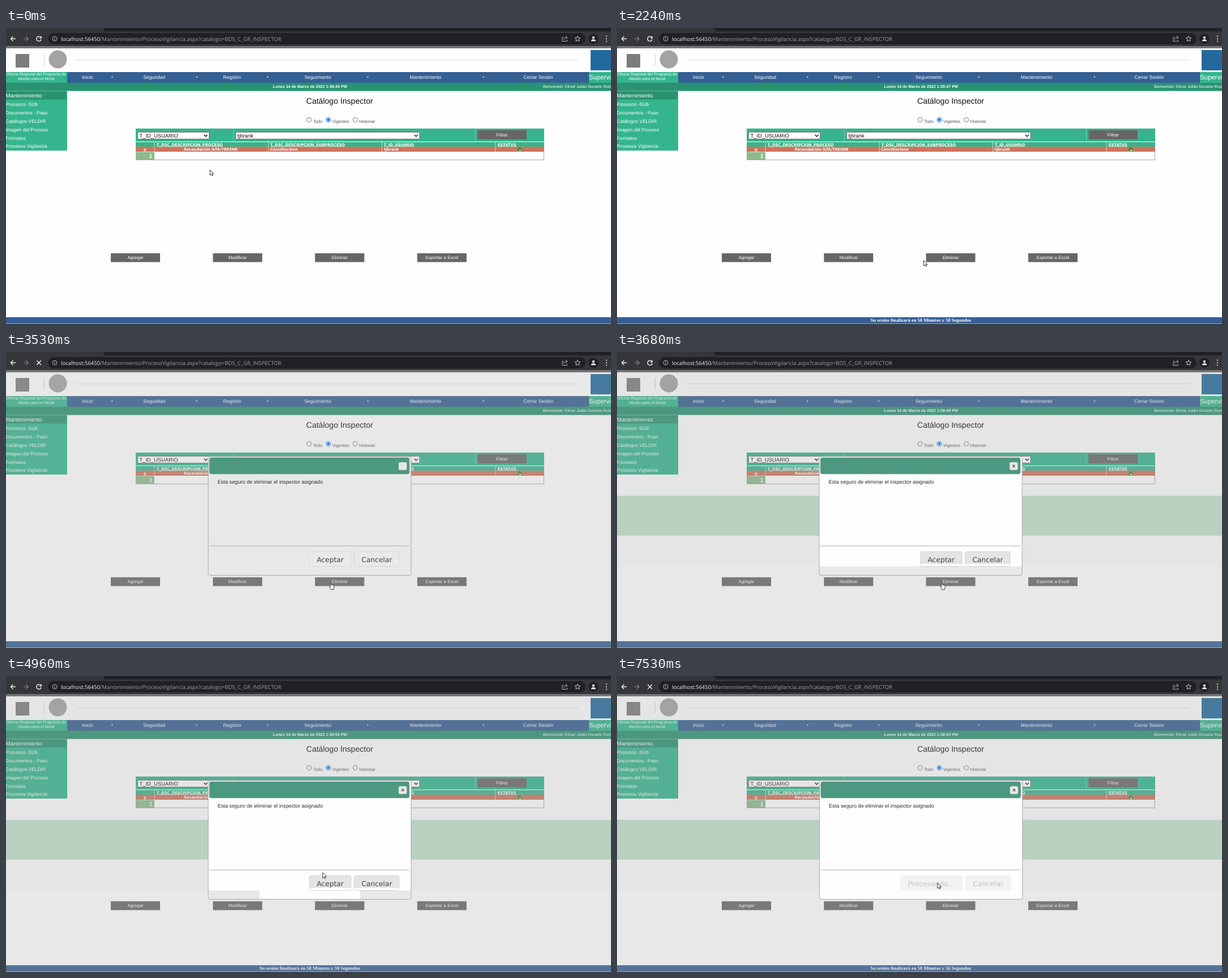
Animation of 1068x524 px, one loop 8 s. Source, as an HTML page:

```html
<!DOCTYPE html>
<html lang="es">
<head>
<meta charset="utf-8">
<title>Catálogo Inspector</title>
<style>
  html, body { margin: 0; width: 100%; height: 100%; overflow: hidden; background: #fff; }
  svg { display: block; }
  text { font-family: "Liberation Sans", Arial, sans-serif; text-rendering: geometricPrecision; white-space: pre; }
  .url { font-family: "Open Sans", "Noto Sans", sans-serif; }
  .grid { font-family: "DejaVu Sans", Verdana, sans-serif; font-weight: bold; }
  .link { text-decoration: underline; }
  .wide { font-family: "DejaVu Sans", Verdana, sans-serif; }
  .serif { font-family: "Liberation Serif", Times, serif; font-weight: bold; }
  .bold { font-weight: bold; }
  .mid { text-anchor: middle; }
</style>
</head>
<body>
<svg id="stage" width="1068" height="524" viewBox="0 0 1068 524"></svg>
<script>
const GREEN = '#35b58e', DARK = '#2a9270', BLUE = '#365f93', GREY = '#666666', RUST = '#d1735d';

const rect = (x, y, w, h, fill, more = '') =>
  `<rect x="${x}" y="${y}" width="${w}" height="${h}" fill="${fill}" ${more}/>`;
const circle = (x, y, r, fill, more = '') =>
  `<circle cx="${x}" cy="${y}" r="${r}" fill="${fill}" ${more}/>`;
const text = (x, y, size, str, fill = '#fff', cls = '', id = '') =>
  `<text x="${x}" y="${y}" font-size="${size}" fill="${fill}" class="${cls}" id="${id}">${str}</text>`;
const line = (d, stroke, width = 1, more = '') =>
  `<path d="${d}" fill="none" stroke="${stroke}" stroke-width="${width}" ${more}/>`;

function toolbar() {
  const dots = [14.5, 19, 23.5].map(y => circle(1060, y, 1.1, '#e8eaed')).join('');
  return rect(0, 0, 1068, 32, '#35363a')
    + rect(0, 32, 1068, 4, '#747577')
    + `<path d="M172 0H1068V6H176Q172.500 6 172 0Z" fill="#202124"/>`
    + rect(74, 9, 949, 20, '#202124', 'rx="10"')
    + line('M17 19H8.500M12.500 14.800L8.300 19L12.500 23.200', '#f1f3f4', 1.3)
    + line('M30.500 19H39M35 14.800L39.200 19L35 23.200', '#85878a', 1.2)
    + `<g id="reload">${line('M61.200 16.300A4.200 4.200 0 1 0 62.200 20', '#f1f3f4', 1.4)}`
    + `<path d="M62.700 14V18.500H58.200Z" fill="#f1f3f4"/></g>`
    + `<g id="stop">${line('M54.300 15.200L61.800 22.700M61.800 15.200L54.300 22.700', '#f1f3f4', 1.4)}</g>`
    + circle(86, 19, 4, 'none', 'stroke="#b4b7bb"')
    + line('M86 18.300V21.300M86 16.400V17.400', '#b4b7bb')
    + text(97, 22.5, 9.45, 'localhost:56450<tspan fill="#9aa0a6">/Mantenimiento/ProcesoVigilancia.aspx?catalogo=BDS_C_GR_INSPECTOR</tspan>', '#f1f3f4', 'url')
    + line('M984.500 16.500H982V23.500H990.500V21M984.500 20.500Q985 16.800 990.500 16.800M988 14L991 16.800L988 19.600', '#b4b7bb')
    + line('M1009 14.300L1010.400 17.400L1013.800 17.700L1011.200 20L1012 23.300L1009 21.500L1006 23.300L1006.800 20L1004.200 17.700L1007.600 17.400Z', '#c8cacd')
    + circle(1037, 19, 8.8, '#202124')
    + circle(1037, 17, 2.2, '#f1f3f4')
    + `<path d="M1032.800 23.200Q1033 20 1037 20T1041.200 23.200Z" fill="#f1f3f4"/>`
    + dots;
}

function header() {
  const nav = [[134, 'Inicio'], [242.3, 'Seguridad'], [383.3, 'Registro'], [526.7, 'Seguimiento'],
    [712.7, 'Mantenimiento'], [913.3, 'Cerrar Sesión']];
  return rect(17, 46, 24, 24, '#7c7c7c')
    + line('M67.500 46V66', '#cfcfcf')
    + circle(91.5, 55.5, 16, '#a3a3a3')
    + line('M123 56.500H1011', '#dedede')
    + rect(1032, 39, 36, 36, '#23699c')
    + rect(0, 78, 108, 19, GREEN)
    + rect(108, 78, 921, 19, BLUE)
    + rect(1029, 78, 39, 19, GREEN)
    + text(53, 84, 7.06, 'Oficina Regional del Programa de', '#fff', 'mid')
    + text(53, 91.5, 7.06, 'Abasto para el litoral', '#fff', 'mid')
    + nav.map(([x, s]) => text(x, 90.3, 8.5, s)).join('')
    + [187.3, 336.3, 462, 638.7, 843].map(x => text(x, 91, 8.5, '*', '#fff', 'mid')).join('')
    + text(1029, 90.5, 11.4, 'Supervi')
    + rect(0, 97, 1068, 14.5, DARK)
    + text(471.3, 106.3, 7.1, '', '#fff', 'bold', 'date')
    + text(948, 106.3, 7.05, 'Bienvenido: Elmar Julián Dovarte Ruiz');
}

function sideMenu() {
  const items = ['Procesos -SUb', 'Documentos - Paso', 'Catálogos VELDIR', 'Imagen del Proceso', 'Formatos', 'Procesos Vigilancia'];
  return rect(0, 111.5, 108, 105.5, GREEN)
    + rect(0, 112, 107, 14.5, DARK)
    + text(-0.5, 122.8, 9.8, 'Mantenimiento')
    + items.map((s, i) => text(-0.7, 137.7 + i * 14.95, 8.43, s)).join('');
}

const button = (x, y, label, id = '') =>
  `<g id="${id}">${rect(x, y, 87, 15.6, GREY)}${text(x + 43.5, y + 10.6, 7.95, label, '#fff', 'mid')}</g>`;

const select = (x, w, label) =>
  rect(x + .5, 184.5, w - 1, 12, '#fff', 'stroke="#767676" rx="1"')
  + text(x + 3.5, 193.7, 9.4, label, '#111')
  + line(`M${x + w - 9.5} 189l3 3l3 -3`, '#111', 1.4);

const radio = (x, label, on) =>
  circle(x, 162.5, 4, '#fff', `stroke="${on ? '#0075ff' : '#767676'}"`)
  + (on ? circle(x, 162.5, 2.4, '#0075ff') : '')
  + text(x + 7, 167.6, 7.7, label, '#555');

function catalog() {
  const heads = [[266, 'T_DSC_DESCRIPCION_PROCESO'], [466.5, 'T_DSC_DESCRIPCION_SUBPROCESO'], [667, 'T_ID_USUARIO'], [868, 'ESTATUS']];
  const cells = [[314, 'Recaudación ILTA/TRESNE'], [466, 'Conciliaciónn'], [667, 'tjbrank']];
  return text(530, 134.3, 14.05, 'Catálogo Inspector', '#111')
    + radio(535, 'Todo') + radio(569, 'Vigentes', true) + radio(616.5, 'Historial')
    + rect(229, 178, 721, 23, GREEN)
    + line('M401.500 178V201M828.500 178V201', '#6fcbae')
    + select(232, 127, 'T_ID_USUARIO') + select(405, 325.5, 'tjbrank')
    + rect(832.5, 181, 86.5, 16.3, GREY)
    + text(875.7, 191.8, 8, 'Filtrar', '#fff', 'mid')
    + rect(229.5, 202.5, 720, 31, '#fff', 'stroke="#a8a8a8"')
    + rect(229, 202, 721, 8, GREEN)
    + rect(229, 210, 721, 9, RUST)
    + line('M262 202V219M463 202V219M663.500 202V219M864 202V219', '#e5e0d8', .8)
    + heads.map(([x, s]) => text(x, 208.5, 6.68, s, '#fff', 'grid link')).join('')
    + text(245.3, 216.8, 6.5, 'o', '#fff', 'grid link mid')
    + cells.map(([x, s]) => text(x, 217, 6.55, s, '#fff', 'grid')).join('')
    + `<path d="M903 217.500L904.500 212.500L907 211L910 214L911.500 217.500Z" fill="#258a3d"/>`
    + `<path d="M905.500 217.500L907.500 214.500L909.500 217.500Z" fill="#eef5ea"/>`
    + rect(229.5, 219.5, 32.5, 14, '#8fba8e')
    + text(255.5, 230.2, 10, '1', '#fff', 'bold mid')
    + button(185, 398.8, 'Agregar') + button(365.3, 398.8, 'Modificar')
    + button(545.5, 398.8, 'Eliminar', 'remove') + button(726, 398.8, 'Exportar a Excel');
}

const footer = rect(0, 512, 1068, 11.5, BLUE) + text(447.5, 519.6, 8.5, '', '#fff', 'serif', 'session');

function dialogButton(x, w, label, look) {
  const looks = {
    faint: ['#e9e9e9', '#d9d9d9', '#444'],
    split: ['#e4e4e4', '#d6d6d6', '#444'],
    hover: ['#eeeeee', '#b0b0b0', '#222'],
    off: ['#f3f3f3', '#efefef', '#c2c2c2']
  };
  const [fill, edge, ink] = looks[look];
  return rect(x + .5, 353.5, w - 1, 26, fill, `stroke="${edge}" rx="2"`)
    + (look === 'split' ? rect(x + 1, 375, w - 2, 4, '#fdfdfd') : '')
    + text(x + w / 2, 371.6, 12.28, label, ink, 'wide mid');
}

function dialog(state) {
  if (state === 'none') return '';
  const opening = state === 'opening', working = state === 'working';
  const paper = opening ? '#e8e8e8' : '#fefefe';
  const look = opening ? 'faint' : working ? 'off' : 'split';
  const strip = opening || working ? '' : rect(357.5, 379.5, 357.5, 15.5, '#e8e8e8')
    + (state === 'drawn' ? '' : rect(448, 379.5, 177, 15.5, '#fefefe'));
  return rect(0, 36, 1068, 488, '#aaa', 'opacity=".27"')
    + (opening ? '' : rect(0, 36, 1068, 343.5, '#000', 'opacity=".013"') + rect(0, 254.5, 1068, 70.5, '#b8d1c1'))
    + `<g transform="translate(${working ? .6 : 0} 0)">`
    + rect(357, 185, 358.2, 210.3, paper, 'rx="3"') + strip
    + rect(357, 185, 358.2, 210.3, 'none', 'rx="3" stroke="#a6a6a6"')
    + rect(359.3, 187.3, 352.5, 28.5, '#4d9880', 'rx="3" stroke="#458a74" stroke-width=".7"')
    + rect(693.3, 195.3, 14, 13.5, '#e8e8e8', 'rx="2.5" stroke="#d2d2d2" stroke-width=".7"')
    + (opening ? '' : line('M698.300 199.800L702.500 204M702.500 199.800L698.300 204', '#707070', 1.7))
    + text(373.4, 232.6, 9.2, 'Esta seguro de eliminar el inspector asignado', '#2b2b2b')
    + line('M359 343.300H712', '#aeaeae')
    + (working ? dialogButton(499, 110.5, 'Procesando...', look)
      : dialogButton(535, 74.5, 'Aceptar', state === 'hover' ? 'hover' : look))
    + dialogButton(614.3, 80.3, 'Cancelar', look)
    + '</g>';
}

const pointers = {
  arrow: 'M.500 .500V10L2.700 8L4.100 11.200L5.700 10.500L4.300 7.500H7.200Z',
  hand: 'M2 7.500V1.200Q3 -.200 4 1.200V4.500Q7.800 4.600 8.300 6.300V9.500L7.300 12.800H2.900L.400 8.500Q-.200 6.900 2 7.500Z'
};

const stage = document.getElementById('stage');
stage.innerHTML = rect(0, 0, 1068, 524, '#fefefe') + toolbar() + header() + sideMenu() + catalog() + footer
  + '<g id="dialog"></g><path id="pointer" fill="#fff" stroke="#222" stroke-width=".9" stroke-linejoin="round"/>';

// Each track lists [start ms, ...values]; a value holds until the next start.
const tracks = {
  clock: [[0, 45], [1020, 46], [2090, 47], [2940, 48], [3530, 0], [3680, 49], [4300, 50], [5530, 51], [6540, 52], [7530, 53]],
  left: [[0, 0], [1020, 59], [1940, 58], [2940, 57], [3530, 0], [4300, 59], [5530, 58], [6540, 57], [7530, 56]],
  busy: [[0, false], [2810, true], [3680, false], [5830, true]],
  hover: [[0, false], [2390, true], [3530, false]],
  dialog: [[0, 'none'], [3530, 'opening'], [3680, 'drawn'], [4300, 'patched'], [5110, 'hover'], [5680, 'working']],
  pointer: [
    [0, 'arrow', 359.5, 250.5], [1580, 'arrow', 367, 254], [1700, 'arrow', 391, 291], [1820, 'arrow', 424, 345],
    [1940, 'arrow', 451, 388], [2090, 'arrow', 471, 411], [2240, 'arrow', 541, 411], [2390, 'hand', 567.5, 408],
    [2540, 'hand', 570.8, 407.8], [4300, 'arrow', 570, 390], [4420, 'arrow', 555, 332], [4540, 'arrow', 541, 282],
    [4690, 'arrow', 542, 292], [4810, 'arrow', 548, 310], [4960, 'arrow', 558.5, 347.5],
    [5110, 'arrow', 562, 367], [5250, 'arrow', 565.3, 366]
  ]
};
const at = (name, t) => tracks[name].findLast(step => step[0] <= t).slice(1);

const $ = id => document.getElementById(id);
const show = (id, on) => $(id).setAttribute('visibility', on ? 'visible' : 'hidden');
let shown = '';

function draw(t) {
  const [clock] = at('clock', t), [left] = at('left', t), [busy] = at('busy', t);
  const [hover] = at('hover', t), [state] = at('dialog', t), [shape, x, y] = at('pointer', t);
  $('date').textContent = clock ? `Lunes 14 de Marzo de 2022 1:38:${clock} PM` : '';
  $('session').textContent = left ? `Su sesión finalizará en 58 Minutos y ${left} Segundos` : '';
  show('reload', !busy);
  show('stop', busy);
  $('remove').firstChild.setAttribute('fill', hover ? '#a8a8a8' : GREY);
  if (state !== shown) $('dialog').innerHTML = dialog(shown = state);
  $('pointer').setAttribute('d', pointers[shape]);
  $('pointer').setAttribute('transform', `translate(${x} ${y})`);
}

const start = performance.now();
function tick() {
  draw((performance.now() - start) % 8000);
  requestAnimationFrame(tick);
}
tick();
</script>
</body>
</html>
```
